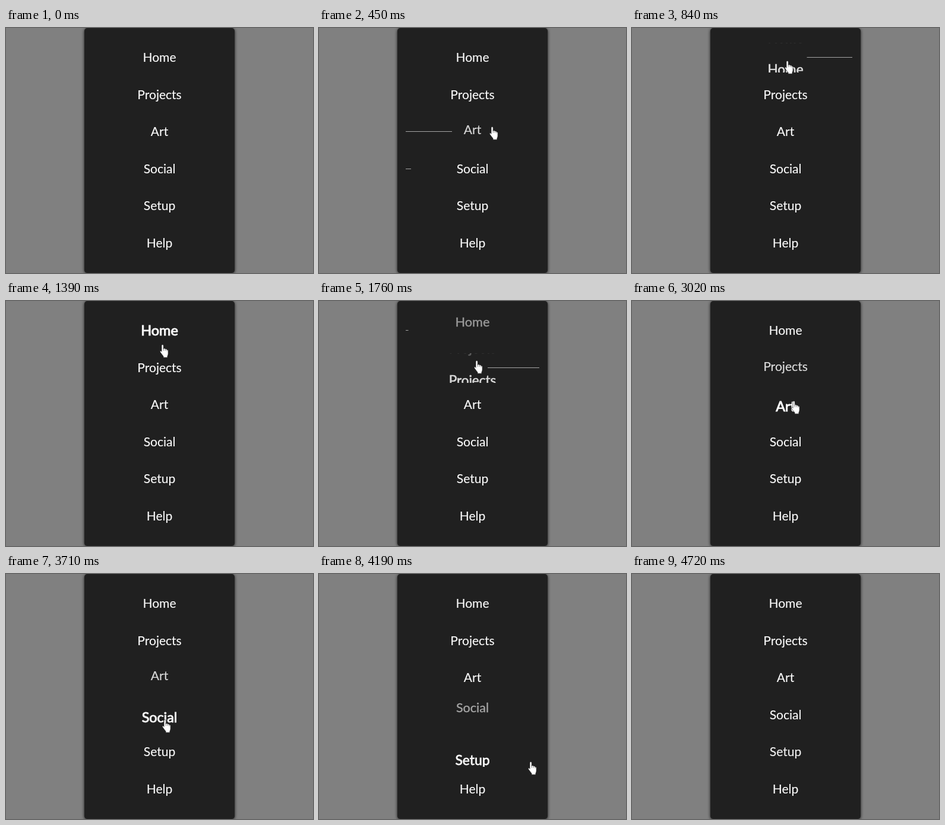
Write an HTML page that moves like this. It is 517 px wide and 413 px high and loops after 4800 ms.

```html
<!DOCTYPE html>
<html lang="en">
<head>
<meta charset="utf-8">
<title>Menu</title>
<style>
  html, body { margin: 0; width: 100%; height: 100%; overflow: hidden; background: #808080; }
  nav {
    position: absolute; left: 132px; top: 0; width: 253px; height: 413px;
    border-radius: 5px; background: #202020; box-shadow: 0 1px 5px rgba(0, 0, 0, .85);
  }
  .item {
    position: absolute; left: 14px; width: 225px; height: 50px; overflow: hidden;
    font: 21px/50px Lato, "Open Sans", sans-serif; text-align: center; color: #fafafa;
  }
  .pair { position: absolute; inset: 0; }
  .pair span {
    position: absolute; left: 0; width: 100%; top: -1px;
    -webkit-text-stroke: var(--bold) #fafafa;
  }
  .pair span + span { top: 49px; }
  .line { position: absolute; left: 0; top: 24px; width: 100%; height: 1px; background: #a4a4a4; }
  #hand { position: absolute; left: 0; top: 0; width: 16px; height: 24px; overflow: visible; }
</style>
</head>
<body>
<nav></nav>
<svg id="hand" viewBox="0 0 16 24">
  <path fill="#fff" stroke="#222" stroke-width=".7" d="M3 2Q3 .5 4.6 .5T6.2 2V8l.3-.9q1.5-1 2.6.4l.2.5q1.6-.8 2.5.6l.2.6q1.8-.4 2.1 1.4v5.2q0 2.2-1.2 4.2v2.2H6v-2Q3.5 17 .6 13q-.8-1.7.8-1.9Q2.4 11 3 12.4z"/>
  <path fill="none" stroke="#555" stroke-width=".7" d="M6.3 8v3M9.3 8v3M12 9.2v2.3"/>
</svg>
<script>
const LOOP = 4800, TEXT_MS = 700, LINE_MS = 300;

// label, then [enter, leave] times of the pointer
const MENU = [
  ['Home', [592, 1464]],
  ['Projects', [495, 570], [1519, 2505]],
  ['Art', [399, 476], [2520, 3220]],
  ['Social', [303, 380], [3234, 3865]],
  ['Setup', [207, 284], [3880, 4230]],
  ['Help', [150, 187]]
];

// time, x, y of the pointer
const PATH = [
  [150, 342, 362], [590, 262, 75], [620, 258, 45], [840, 257, 55], [1464, 259, 75],
  [1519, 260, 88], [1760, 261, 100], [2390, 264, 109], [2505, 266, 137],
  [2520, 266, 150], [3020, 268, 168], [3220, 266, 200], [3234, 266, 212],
  [3710, 263, 245], [3865, 263, 262], [3960, 264, 306], [4230, 367, 318], [4500, 498, 405]
];

const clamp = v => Math.min(1, Math.max(0, v));
const linear = clamp;

// cubic-bezier(.25, .1, .25, 1)
function ease(x) {
  if (x <= 0 || x >= 1) return clamp(x);
  const bez = (s, a, b) => 3 * s * (1 - s) * (1 - s) * a + 3 * s * s * (1 - s) * b + s * s * s;
  let lo = 0, hi = 1;
  for (let i = 0; i < 24; i++) {
    const mid = (lo + hi) / 2;
    if (bez(mid, .25, .25) < x) lo = mid; else hi = mid;
  }
  return bez(lo, .1, 1);
}

// hover progress; an interrupted transition returns in proportionally less time
function progress(spans, t, ms, curve) {
  const span = spans.filter(s => s[0] <= t).pop();
  if (!span) return 0;
  const [on, off] = span;
  if (t < off) return curve((t - on) / ms);
  const top = curve((off - on) / ms);
  return top * (1 - curve((t - off) / (ms * top)));
}

function el(parent, tag, cls, text = '') {
  const node = document.createElement(tag);
  node.className = cls;
  node.textContent = text;
  return parent.appendChild(node);
}

const nav = document.querySelector('nav');
const hand = document.getElementById('hand');
const items = MENU.map(([label, ...spans], i) => {
  const box = el(nav, 'div', 'item');
  box.style.top = 25 + 62.5 * i + 'px';
  const pair = el(box, 'div', 'pair');
  return {
    spans, pair,
    first: el(pair, 'span', '', label),
    second: el(pair, 'span', '', label),
    line: el(box, 'div', 'line')
  };
});

function drawItem({ spans, pair, first, second, line }, t) {
  const p = progress(spans, t, TEXT_MS, ease);
  const q = progress(spans, t, LINE_MS, linear);
  pair.style.transform = `scale(${1 + .12 * p}) translateY(${-50 * p}px)`;
  pair.style.setProperty('--bold', .15 + .75 * p + 'px');
  first.style.opacity = 1 - p ** .65;
  second.style.opacity = clamp(.25 + p);
  line.style.transform = `translateX(${200 * q - 100}%)`;
}

function drawHand(t) {
  const i = PATH.findIndex(k => k[0] > t);
  hand.style.display = i > 0 ? '' : 'none';
  if (i < 1) return;
  const [t0, x0, y0] = PATH[i - 1], [t1, x1, y1] = PATH[i];
  const f = (t - t0) / (t1 - t0);
  const x = Math.round(x0 + (x1 - x0) * f), y = Math.round(y0 + (y1 - y0) * f);
  hand.style.transform = `translate(${x}px, ${y}px)`;
}

const start = performance.now();
function frame() {
  const t = (performance.now() - start) % LOOP;
  items.forEach(item => drawItem(item, t));
  drawHand(t);
  requestAnimationFrame(frame);
}
frame();
</script>
</body>
</html>
```
